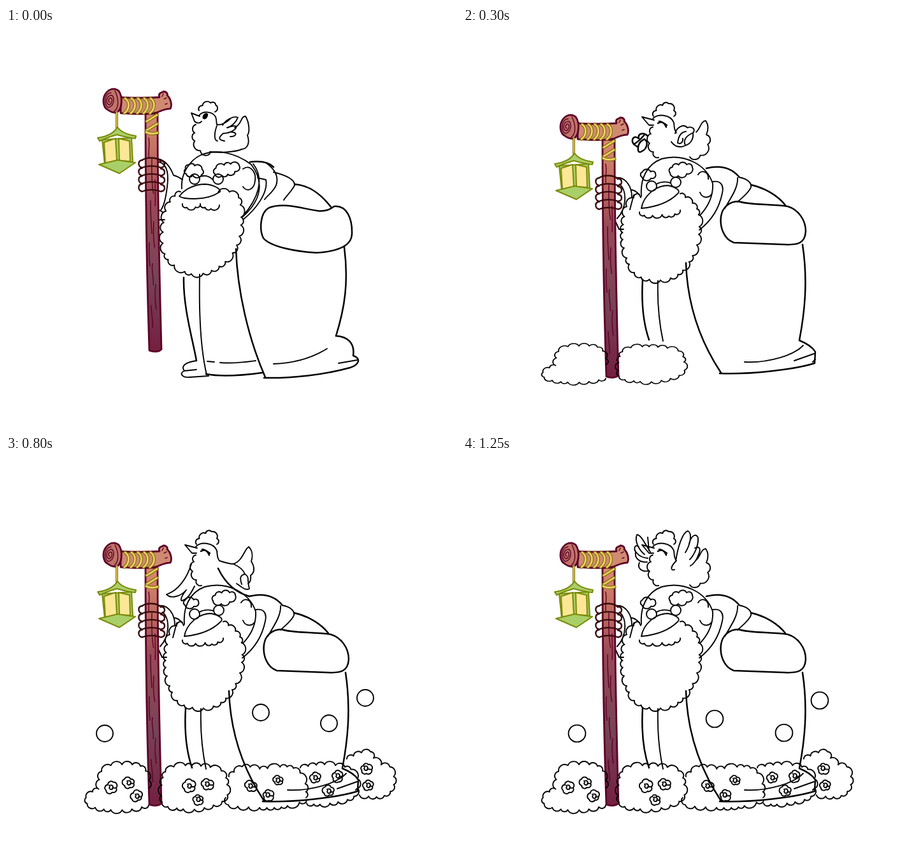
An HTML page for the animation above (1.4 s loop, 708 px wide and 630 px high).

```html
<!DOCTYPE html>
<html lang="en">
<head>
<meta charset="utf-8">
<title>Old wanderer with a lantern staff</title>
<style>
html, body { margin: 0; width: 100%; height: 100%; overflow: hidden; background: #fff; }
svg { display: block; width: 100vw; height: 100vh; }
path, circle { stroke-linecap: round; stroke-linejoin: round; }
.ink { fill: none; stroke: #000; stroke-width: 1.9; }
.bold { fill: none; stroke: #000; stroke-width: 2.5; }
.wood { stroke: #5c0028; stroke-width: 2.8; }
.grain { fill: none; stroke: #5c0028; stroke-width: 1.4; }
.rope { fill: none; stroke: #857410; stroke-width: 5.2; }
.rope.in { stroke: #f3d563; stroke-width: 2.6; }
.cord { stroke-width: 4; }
.cord.in { stroke-width: 1.6; }
.leaf { fill: #a9cf68; stroke: #7c8a08; stroke-width: 2.1; }
.glow { fill: #fce797; stroke: #7c8a08; stroke-width: 2; }
.hand { fill: none; stroke: #38090c; stroke-width: 2.4; }
</style>
</head>
<body>
<svg id="stage" viewBox="0 0 708 630" preserveAspectRatio="none">
  <defs>
    <linearGradient id="bark" gradientUnits="userSpaceOnUse" x1="0" y1="177" x2="0" y2="549">
      <stop offset="0" stop-color="#d78b70"/><stop offset=".2" stop-color="#bc695f"/>
      <stop offset=".36" stop-color="#994a57"/><stop offset=".7" stop-color="#774256"/>
      <stop offset="1" stop-color="#741f40"/>
    </linearGradient>
  </defs>
</svg>
<script>
const stage = document.getElementById('stage');

function add(parent, tag, attrs = {}) {
  const el = document.createElementNS('http://www.w3.org/2000/svg', tag);
  for (const k in attrs) el.setAttribute(k, attrs[k]);
  return parent.appendChild(el);
}
const line = (g, cls, d, fill) => add(g, 'path', { class: cls, d, ...(fill && { fill }) });

function random(seed) {
  return () => {
    seed = (seed * 16807 + 11) % 2147483647;
    return seed / 2147483647;
  };
}

// Points along a smooth curve through the key points
function smooth(p, closed) {
  const n = p.length, out = [];
  const at = i => closed ? p[(i + n) % n] : p[Math.max(0, Math.min(n - 1, i))];
  for (let i = 0; i < (closed ? n : n - 1); i++) {
    const [a, b, c, d] = [at(i - 1), at(i), at(i + 1), at(i + 2)];
    for (let u = 0; u < 1; u += .05) {
      out.push([0, 1].map(k => b[k] + .5 * u * (c[k] - a[k]
        + u * (2 * a[k] - 5 * b[k] + 4 * c[k] - d[k] + u * (3 * (b[k] - c[k]) + d[k] - a[k])))));
    }
  }
  return [...out, closed ? p[0] : p[n - 1]];
}

// Scalloped outline with bumps of uneven width, always bulging outward
function cloud(text, size = 14, closed = false) {
  const n = text.split(' ').map(Number), keys = [];
  for (let i = 0; i < n.length; i += 2) keys.push([n[i], n[i + 1]]);
  const area = keys.reduce((s, a, i) => {
    const b = keys[(i + 1) % keys.length];
    return s + a[0] * b[1] - b[0] * a[1];
  }, 0);
  const pts = smooth(keys, closed), far = [0];
  pts.slice(1).forEach((p, i) => far.push(far[i] + Math.hypot(p[0] - pts[i][0], p[1] - pts[i][1])));
  const total = far[far.length - 1], rnd = random(n[0] * 31 + n[1]);
  const widths = Array.from({ length: Math.max(2, Math.round(total / size)) }, () => .7 + rnd() * .6);
  const sum = widths.reduce((a, b) => a + b);
  let run = 0, last = pts[0], d = `M${last}`;
  for (const w of widths) {
    run += w / sum * total;
    const p = pts[Math.max(0, far.findIndex(f => f >= run - .01))] || pts[0];
    const end = run > total - .1 ? pts[pts.length - 1] : p;
    const r = Math.hypot(end[0] - last[0], end[1] - last[1]) * .55;
    d += `A${r} ${r} 0 0 ${area > 0 ? 1 : 0} ${end}`;
    last = end;
  }
  return d;
}
const puff = (text, size) => cloud(text, size, true);
const ring = (x, y, r) => `M${x - r} ${y}a${r} ${r} 0 1 1 ${2 * r} 0a${r} ${r} 0 1 1 ${-2 * r} 0`;
const glasses = (x, y, x2, y2) => ring(x, y, 8) + ring(x2, y2, 8)
  + `M${x + 7} ${y - 3}Q${(x + x2) / 2} ${y - 9} ${x2 - 8} ${y2 + 1}`;

function flower(x, y) {
  const rnd = random(x * 7 + y), pts = [];
  const turn = rnd() * 6;
  for (let i = 0; i < 5; i++) {
    const a = turn + i * 1.257, r = 5.5 + rnd() * 4;
    pts.push([x + Math.cos(a) * r, y + Math.sin(a) * r]);
  }
  const petals = pts.map((p, i) => {
    const q = pts[(i + 1) % 5], r = Math.hypot(q[0] - p[0], q[1] - p[1]) * .53;
    return `M${p}A${r} ${r} 0 0 1 ${q}`;
  });
  return petals.join('') + `M${x - 3} ${y - 3}q5 -2 6 2q0 5 -4 4q-3 -2 -1 -4M${pts[0]}L${x + 2} ${y + 1}`;
}
const flowers = (...list) => list.map(p => flower(...p)).join('');
const bud = (x, y) => `M${x - 4} ${y + 4}q-1 -6 8 -8q1 5 -8 8`;

const men = {
  lift: {
    ink: 'M276 253C274 231 287 209 306 200C330 190 360 196 385 215C398 232 401 250 394 268C388 282 380 290 372 297'
      + 'M372 222C383 214 393 227 391 240C390 255 378 259 372 250'
      + puff('283 230 286 216 306 221 307 231', 11) + puff('328 230 332 219 360 214 366 222 342 232', 12)
      + glasses(296, 238, 333, 238)
      + 'M272 265C280 254 296 246 313 246C326 247 337 253 336 258C324 266 310 269 296 269C286 269 276 268 272 265'
      + cloud('277 277 290 285 305 277', 10) + cloud('305 277 319 285 335 279', 10)
      + cloud('274 258 259 272 249 298 247 345 260 370 297 388 338 373 362 342 369 300 362 262 333 259', 15)
      + 'M238 206C251 208 258 219 263 232C268 233 273 236 277 239M240 211C252 214 256 228 253 250C251 268 248 280 243 287M237 285L246 290M237 302L249 302'
      + 'M388 214C402 232 403 260 372 296M395 236L408 239C412 258 394 284 372 302'
      + 'M409 213C424 224 428 236 424 248C418 260 411 263 406 270M420 227C440 232 454 239 453 248C447 259 441 263 436 271'
      + 'M304 388C303 440 304 500 315 546M299 524C285 526 273 531 280 540C271 544 277 551 288 550L318 548M280 540L299 538'
      + 'M316 525L327 526M336 527C360 529 378 526 392 524M420 529C450 528 480 520 504 505M522 528L551 523',
    bold: 'M383 211C400 209 413 212 420 219M453 246C480 248 498 266 511 283'
      + 'M413 283C438 274 466 285 490 288C502 289 508 286 515 281C535 279 544 300 543 325C542 344 520 352 487 354C455 352 416 345 404 331C398 319 398 291 413 283'
      + 'M361 348C363 412 380 488 407 550M531 345C538 400 532 440 518 485C536 486 548 496 545 516C559 521 553 531 540 535C500 546 450 552 405 551'
      + 'M279 393C278 440 293 490 299 524M314 545C340 550 380 546 402 543'
  },
  squash: {
    ink: 'M281 250C282 225 305 207 335 207C365 208 386 225 390 247C392 263 390 275 385 286M371 237C384 231 388 245 384 257'
      + puff('281 245 282 233 304 239 303 247', 11) + puff('323 239 328 227 356 221 360 234 340 241', 12)
      + glasses(294, 254, 333, 246)
      + 'M282 290C282 272 299 252 318 252C334 252 344 256 340 265C329 283 306 290 282 290'
      + cloud('281 294 294 296 308 289', 10) + cloud('308 289 325 295 340 279', 11)
      + cloud('279 260 262 272 250 292 247 330 264 358 290 386 330 381 358 360 376 330 385 298 382 270 340 257', 16)
      + 'M240 224C256 219 268 236 267 260M246 237C264 246 258 282 243 295M267 258L279 258M240 302L249 302'
      + 'M391 244C401 240 412 245 409 256C405 270 398 280 388 288M424 233C428 248 419 262 409 276M424 233C440 229 454 235 452 246C445 260 433 269 416 271'
      + 'M317 386C308 440 312 505 322 549M331 531C350 533 372 530 386 522M442 527C480 524 518 512 539 503M520 524L551 520',
    bold: 'M380 221C396 217 415 220 424 233M452 246C472 248 489 260 497 269'
      + 'M416 271C440 277 468 276 489 275C497 265 505 262 512 263C530 269 535 290 531 310C526 330 510 336 490 338C450 338 419 330 405 312C398 293 404 277 416 271'
      + 'M526 327C550 390 560 436 544 471C536 485 527 487 524 491C535 490 541 497 540 504C556 508 556 516 553 527C520 538 455 547 403 544'
      + 'M351 362C352 430 375 505 409 542M284 390C268 440 270 495 291 532M285 551L322 550M322 547C350 548 380 545 405 541'
  },
  calm: {
    ink: 'M280 265C278 238 288 215 312 206C346 197 382 214 392 245C393 263 386 280 372 295M369 231C374 222 386 226 385 238M372 259C376 269 386 268 390 262'
      + puff('281 235 284 225 301 229 302 236', 11) + puff('325 228 332 217 356 216 359 226 336 233', 12)
      + glasses(296, 249, 334, 243)
      + 'M280 284C283 265 302 248 322 248C336 251 342 257 337 261C322 276 302 282 280 284'
      + cloud('277 290 290 297 306 293 325 296 341 287', 12)
      + cloud('277 262 260 275 253 300 251 335 261 372 277 391 310 397 340 386 361 357 370 325 367 285 341 261', 14)
      + 'M240 236C254 234 265 248 265 266M246 246C258 257 257 284 242 300M265 255C272 256 277 262 279 267M268 263L262 286M240 306L245 317L252 317'
      + 'M392 242C404 240 410 247 407 260C402 285 388 305 371 318M431 236C432 252 420 268 411 284M433 235C449 238 455 246 451 253C445 263 437 268 431 274'
      + 'M306 398C305 430 308 465 314 493M442 526C480 528 520 515 534 500M520 524L551 513M549 526L553 522',
    bold: 'M382 221C402 216 420 219 433 234M452 247C475 252 495 265 506 279'
      + 'M432 273C450 279 482 277 510 281C526 286 538 302 538 320C537 339 526 342 505 341L425 338C409 332 403 313 405 297C407 282 419 273 432 273'
      + 'M533 341C542 400 536 450 528 492C540 497 549 503 553 510L552 528C520 538 450 546 403 544M350 370C352 430 370 490 405 543'
      + 'M282 396C280 430 283 465 292 491'
  }
};

// The singing bird: one body, three wing poses
const singer = cloud('299 139 306 127 321 119 330 126 331 139', 11)
  + 'M281 140L300 145M281 140L292 153L299 153M298 143C304 134 326 136 331 149C332 156 331 160 335 165'
  + cloud('298 156 294 172 294 188 307 204', 14);
const tail = 'M366 164C373 158 373 147 381 146C386 153 385 161 382 168' + cloud('382 168 384 186 376 199 356 203', 18);
const wink = 'M306 150C312 146 316 149 319 156M308 147C313 147 316 151 320 153';
const birds = {
  perch: {
    ink: cloud('303 130 309 122 323 118 331 124 328 132', 11)
      + 'M291 134L304 139M291 134L296 147C300 151 305 150 307 147M303 138C309 130 324 131 329 140C331 145 330 149 331 152C338 154 347 148 352 143'
      + cloud('298 152 296 175 302 191 320 198', 14)
      + 'M340 153C345 144 358 138 364 141C361 149 354 155 348 157M347 157C358 153 366 153 359 160C352 165 347 166 341 166M354 164C364 164 362 171 352 171M341 166C334 172 332 176 343 178M331 154C327 165 326 177 332 178'
      + 'M359 157C371 151 368 139 376 139C382 149 383 164 379 169C383 180 380 190 370 191C360 195 340 197 320 195',
    bold: 'M310 142C309 138 313 134 316 136C316 140 313 144 310 142M312 140L314 138'
  },
  hit: {
    ink: cloud('288 149 291 139 302 133 312 140 314 151', 11)
      + 'M284 165C279 157 284 151 289 151M292 152C300 146 312 150 318 158C322 164 335 164 345 163'
      + 'M277 181L294 170M277 181C287 183 295 184 294 177'
      + cloud('294 183 299 198 327 207', 14)
      + 'M339 165C328 172 328 185 340 184C342 191 351 189 351 183C358 182 361 172 361 165M345 163C352 162 358 162 362 164M346 184C349 176 346 170 344 168M353 181C357 174 356 168 361 165'
      + 'M361 165C372 161 371 152 377 150C384 156 382 165 378 172C387 178 383 188 378 190C378 200 368 205 355 206L335 207',
    bold: 'M295 160L303 163M295 167L303 163L296 169M299 160L304 158'
  },
  mid: {
    ink: singer + tail + 'M333 166C336 155 347 151 352 157C360 154 366 160 361 165C362 173 359 182 349 185C341 190 331 186 327 179M337 181C338 171 342 164 350 163M349 185C345 176 350 170 361 165M337 181C342 184 346 179 345 174',
    bold: wink + 'M290 170C282 163 274 167 276 174C268 168 263 176 268 183C274 180 280 174 285 168M275 193C274 184 278 178 285 175C292 180 288 191 281 194C278 196 276 196 275 193M268 183L275 188'
  },
  down: {
    ink: singer + 'M291 170C284 193 270 212 252 218C258 225 274 222 283 211C276 220 273 227 276 228C286 225 291 215 296 205'
      + 'M335 165C344 168 351 170 357 170C368 175 373 180 375 186C383 190 378 196 382 209C376 213 369 205 362 201M375 186C367 188 367 193 370 202'
      + 'M357 170C372 165 374 147 381 143C388 150 387 160 385 166C392 177 389 185 384 188C385 196 383 199 380 201',
    bold: wink + 'M333 177C344 200 360 215 382 221'
  },
  up: {
    ink: singer + tail + 'M294 151C287 141 280 124 273 124C269 134 276 148 285 155M276 143C269 137 267 148 273 153C277 158 282 160 290 161M271 151C269 160 276 168 289 167M277 168C273 176 280 183 291 181M292 149L290 128'
      + 'M334 166C337 143 345 120 353 118C361 122 356 141 349 152M355 138C359 123 367 122 369 129C370 142 362 157 356 163M364 145C372 141 374 147 369 157C366 165 362 170 357 173M334 166C326 174 325 181 332 179',
    bold: wink
  }
};

const leftBush = cloud('224 550 190 557 152 556 128 548 128 533 146 524 147 507 156 490 185 486 212 489 223 505 224 523');
const midBush = puff('245 545 247 505 262 490 300 488 338 496 347 520 342 542 300 556 260 553');
const bushes = [
  { from: 200, to: 200, d: puff('173 549 184 528 206 524 215 544 195 553', 13) + puff('259 546 264 524 288 521 296 535 295 549 272 549', 13)
    + 'M276 537C283 530 290 530 296 525M275 536C281 543 288 540 298 542'
    + 'M208 522C214 530 216 540 218 548M213 528L222 543L224 530L232 545L243 526L247 543L257 529L255 544' },
  { from: 300, to: 300, d: leftBush + midBush, grow: .8 },
  { from: 400, d: leftBush + midBush + flowers([165, 522], [193, 515], [206, 536], [288, 520], [316, 517], [302, 541])
    + cloud('350 505 372 489 400 493 445 490 467 507 471 538') + cloud('472 542 430 553 385 553 348 549 345 538') },
  { from: 400, to: 400, d: bud(386, 520) + bud(421, 513) + bud(409, 537) + cloud('472 519 495 516 503 530 497 546 472 546') },
  { from: 500, d: flowers([384, 520], [427, 511], [411, 534], [486, 507], [521, 504], [507, 528])
    + cloud('462 491 500 486 540 493 552 512 545 537 500 548 472 547') },
  { from: 600, to: 600, d: cloud('534 485 562 465 576 483 589 497 585 523 556 530') + bud(556, 493) + bud(569, 514) },
  { from: 700, d: cloud('535 477 570 465 581 484 604 491 608 520 590 536 555 534') + flowers([565, 492], [569, 519]) }
];

function sketch(set) {
  const out = {};
  for (const k in set) {
    out[k] = add(stage, 'g');
    line(out[k], 'ink', set[k].ink);
    line(out[k], 'bold', set[k].bold);
  }
  return out;
}
const manEls = sketch(men), birdEls = sketch(birds);

function rope(g, d, extra = '') {
  const el = add(g, 'g');
  line(el, `rope ${extra}`, d);
  line(el, `rope in ${extra}`, d);
  return el;
}

const staff = add(stage, 'g');
line(staff, 'wood', 'M219 176L238 176C238 280 240 400 244 547C240 552 230 551 225 549C221 430 219 300 219 176Z', 'url(#bark)');
const rnd = random(77);
for (let i = 0; i < 9; i++) {
  const x = 224 + (i * 5) % 12, y = 214 + i * 33, h = 30 + rnd() * 30;
  line(staff, 'grain', `M${x} ${y}c${3 - rnd() * 6} ${h / 3} ${3 - rnd() * 6} ${h / 1.5} ${rnd() * 3} ${h}`);
}
line(staff, 'wood', 'M180 150C200 152 221 151 241 150C238 142 246 143 247 141C253 141 254 146 253 147C259 152 261 163 258 168C249 168 243 172 237 174C219 178 200 176 180 175Z', '#d08a72');
line(staff, 'wood', 'M160 170C152 166 151 153 156 145C161 137 170 134 177 140C184 150 182 170 174 174C169 175 164 173 160 170Z', '#bf7468');
line(staff, 'grain', 'M171 140C178 154 177 168 169 173M165 143C155 144 153 160 160 166C169 166 172 150 166 147C158 147 155 159 162 162C167 160 168 152 164 151C160 153 160 157 163 158M247 145L245 149M252 151L248 153M253 160L250 161');
for (let x = 187; x < 236; x += 10) rope(staff, `M${x} 152C${x + 8} 157 ${x + 7} 169 ${x - 1} 175`);
for (let y = 185; y < 205; y += 14) rope(staff, `M221 ${y + 3}L237 ${y - 7}`);
rope(staff, 'M220 205C226 208 232 208 238 206');

const lamp = add(stage, 'g');
const cordTight = rope(lamp, 'M174 174L174 198', 'cord');
const cordLoose = rope(lamp, 'M173 197C177 191 169 182 161 185C153 189 157 198 166 197', 'cord');
line(lamp, 'leaf', 'M151 217L197 214L199 252L155 256Z');
line(lamp, 'glow', 'M154 221L172 215L174 250L156 255Z');
line(lamp, 'glow', 'M177 215L194 219L195 251L178 250Z');
line(lamp, 'leaf', 'M146 256L175 249L203 253L178 270Z');
line(lamp, 'leaf', 'M175 197C180 205 191 209 204 211L203 215C192 214 181 211 174 209C164 212 155 215 147 219L144 214C158 212 170 206 175 197Z');

const hand = add(stage, 'g');
line(hand, 'hand', 'M214 236C220 231 238 231 243 238');
for (let y = 236; y < 280; y += 12.5) {
  line(hand, 'hand', `M214 ${y}C206 ${y + 1} 207 ${y + 11} 214 ${y + 12}C222 ${y + 8} 236 ${y + 9} 243 ${y + 12}C251 ${y + 11} 251 ${y + 2} 243 ${y + 1}`);
}

for (const b of bushes) {
  b.el = add(stage, 'g');
  line(b.el, 'ink', b.d);
  if (b.grow) b.el.setAttribute('transform', `translate(0 ${560 * (1 - b.grow)}) scale(1 ${b.grow})`);
}

// Orbs rise from the flowers, then drift through a few points
const keyTimes = [400, 600, 800, 1100, 1250];
const orbs = [
  { x: [181, 160, 155, 178, 179], y: [477, 454, 437, 421, 437] },
  { x: [399, 390, 400, 384, 395], y: [482, 446, 404, 421, 414] },
  { x: [488, 512, 507, 506, 504], y: [492, 439, 421, 420, 436] },
  { x: [580, 572, 564, 576, 560], y: [484, 432, 381, 391, 385], from: 500 }
];
for (const o of orbs) o.el = add(stage, 'circle', { class: 'ink' });

function along(keys, t) {
  const i = Math.max(0, Math.min(3, keyTimes.findIndex(k => k > t) - 1));
  const j = t >= 1250 ? 3 : i;
  return keys[j] + (keys[j + 1] - keys[j]) * (t - keyTimes[j]) / (keyTimes[j + 1] - keyTimes[j]);
}

const show = (el, on) => { el.style.display = on ? '' : 'none'; };
const shift = (el, y) => el.setAttribute('transform', `translate(0 ${y})`);
const pick = (set, name) => { for (const k in set) show(set[k], k === name); };

function draw(t) {
  const lifted = t < 200, hit = t === 200;
  const raise = lifted ? (t ? -46 : -41) : 0;
  const flap = t % 200 === 100 || t === 950 || t === 1250;
  pick(manEls, lifted ? 'lift' : hit ? 'squash' : 'calm');
  pick(birdEls, lifted ? 'perch' : hit ? 'hit' : t < 500 ? 'mid' : flap && t !== 1100 ? 'up' : 'down');
  shift(staff, raise);
  shift(hand, lifted ? raise + 13 : 0);
  shift(lamp, hit ? -11 : raise);
  show(cordTight, !hit);
  show(cordLoose, hit);
  for (const b of bushes) show(b.el, t >= b.from && t <= (b.to || 1400));
  for (const o of orbs) {
    show(o.el, t >= (o.from || 400));
    o.el.setAttribute('cx', along(o.x, t));
    o.el.setAttribute('cy', along(o.y, t));
    o.el.setAttribute('r', Math.max(0, Math.min(13.4, 5 + (t - 400) * .02)));
  }
}

// Drawn on twos: 100 ms holds, then 150 ms holds
const held = t => t < 800 ? Math.floor(t / 100) * 100 : 800 + Math.floor((t - 800) / 150) * 150;
const start = performance.now();
let current;
function tick() {
  const t = held((performance.now() - start) % 1400);
  if (t !== current) draw(current = t);
  requestAnimationFrame(tick);
}
tick();
</script>
</body>
</html>
```
